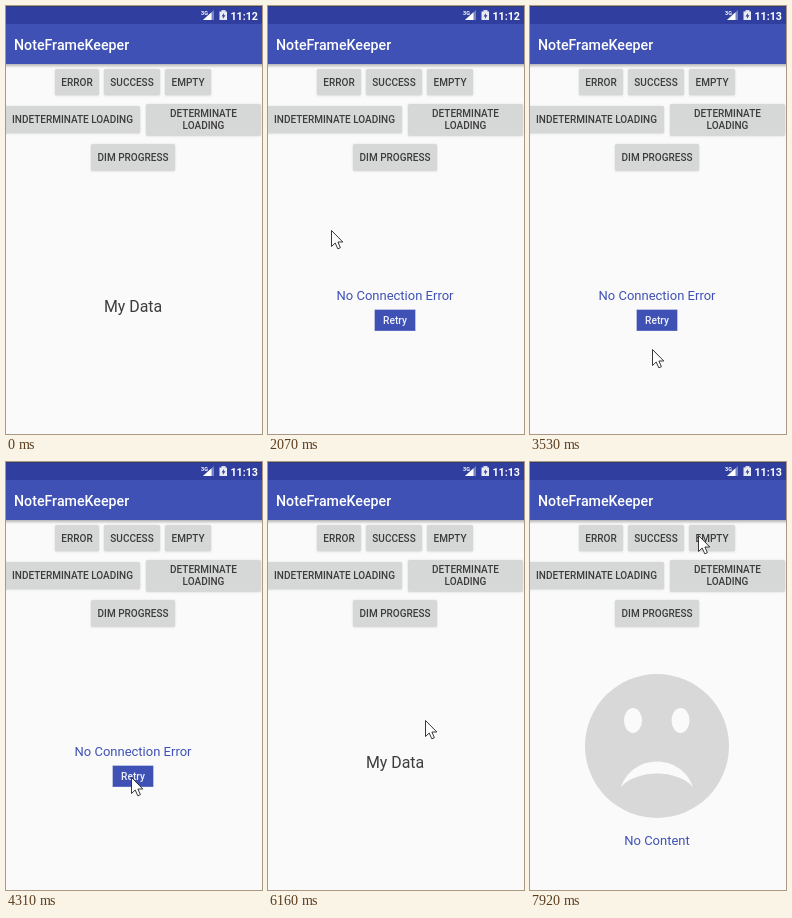
Animation of 256 by 428 pixels, one loop 8000 ms. Source, as an HTML page with a canvas:

```html
<!DOCTYPE html>
<html lang="en">
<head>
<meta charset="utf-8">
<title>Placeholder states</title>
<style>
  html, body { margin: 0; width: 100%; height: 100%; overflow: hidden; background: #fafafa; }
  canvas { display: block; width: 256px; height: 428px; }
</style>
</head>
<body>
<canvas id="stage" width="256" height="428"></canvas>
<script>
const ctx = document.getElementById('stage').getContext('2d');
const LOOP = 8000, TICKS = 104;
const INDIGO = '#3f51b5', PAPER = '#fafafa', INK = '#3c3c3c';

// Ticks at which the screen content switches
const SHOW = { cursor: 2, error: 20, clock: 34, retried: 57, empty: 99 };

// The pointer glides to each goal between two ticks; sway adds a swing on the way
const ENTRY = { x: 176, y: 378 };
const MOVES = [
  { from: 2, to: 10, x: 98, y: 55 },
  { from: 10, to: 17, x: 72, y: 78 },
  { from: 20, to: 27, x: 63, y: 224 },
  { from: 27, to: 37, x: 154, y: 331 },
  { from: 37, to: 52, x: 125, y: 315, sway: 38 },
  { from: 60, to: 70, x: 101, y: 73 },
  { from: 71, to: 80, x: 157, y: 258 },
  { from: 80, to: 84, x: 130, y: 338 },
  { from: 84, to: 94, x: 168, y: 73 }
];

const ease = k => (1 - Math.cos(Math.PI * k)) / 2;

function pointerAt(tick) {
  let { x, y } = ENTRY;
  for (const move of MOVES) {
    if (tick <= move.from) break;
    const k = Math.min(1, (tick - move.from) / (move.to - move.from));
    const swing = (move.sway || 0) * Math.sin(2 * Math.PI * k);
    x += (move.x - x) * ease(k) + swing * 0.6;
    y += (move.y - y) * ease(k) - swing;
  }
  return [Math.round(x), Math.round(y)];
}

function rect(x, y, w, h, color) {
  ctx.fillStyle = color;
  ctx.fillRect(x, y, w, h);
}

function text(str, x, y, size, color = INK, weight = 400, align = 'center') {
  ctx.font = `${weight} ${size}px Roboto, sans-serif`;
  ctx.textAlign = align;
  ctx.fillStyle = color;
  ctx.fillText(str, x, y);
}

function polygon(points, color) {
  ctx.beginPath();
  points.forEach(([x, y]) => ctx.lineTo(x, y));
  ctx.closePath();
  ctx.fillStyle = color;
  ctx.fill();
}

function ellipse(x, y, rx, ry, color) {
  ctx.beginPath();
  ctx.ellipse(x, y, rx, ry, 0, 0, Math.PI * 2);
  ctx.fillStyle = color;
  ctx.fill();
}

function button(x, y, w, h, ...lines) {
  ctx.save();
  ctx.shadowColor = 'rgba(0,0,0,.18)';
  ctx.shadowBlur = 2;
  ctx.shadowOffsetY = 0.5;
  ctx.fillStyle = '#d6d7d7';
  ctx.beginPath();
  ctx.roundRect(x, y, w, h, 1.5);
  ctx.fill();
  ctx.restore();
  const first = y + h / 2 + 3.6 - (lines.length - 1) * 6;
  lines.forEach((line, i) => text(line, x + w / 2, first + i * 12, 10, INK, 500));
}

function statusBar(time) {
  rect(0, 0, 256, 18, '#303f9f');
  rect(0, 0, 256, 1, '#303a70');
  text('3G', 195, 9, 5.5, '#fff', 700, 'left');
  polygon([[197, 14], [208, 14], [208, 4]], 'rgba(255,255,255,.35)');
  polygon([[197, 14], [205.5, 14], [205.5, 6.3]], '#fff');
  rect(215.5, 4, 4, 2, '#d5d9ee');
  rect(213.5, 5.5, 7.5, 8.5, '#e8eaf6');
  polygon([[218, 7], [215.5, 10.5], [217.2, 10.5], [216.8, 13], [219.5, 9.3], [217.8, 9.3]], '#303f9f');
  text(time, 252, 13.5, 10.7, '#fff', 700, 'right');
}

function appBar() {
  const shade = ctx.createLinearGradient(0, 58, 0, 62);
  shade.addColorStop(0, 'rgba(0,0,0,.28)');
  shade.addColorStop(1, 'rgba(0,0,0,0)');
  rect(0, 58, 256, 4, shade);
  rect(0, 18, 256, 40, INDIGO);
  text('NoteFrameKeeper', 8, 44, 14.2, '#fff', 500, 'left');
}

function buttons() {
  button(49, 63, 44, 26, 'ERROR');
  button(98, 63, 56, 26, 'SUCCESS');
  button(159, 63, 46, 26, 'EMPTY');
  button(-1, 100, 135, 27, 'INDETERMINATE LOADING');
  button(140, 98, 115, 31.5, 'DETERMINATE', 'LOADING');
  button(85, 138, 84, 26.5, 'DIM PROGRESS');
}

function errorView() {
  text('No Connection Error', 127, 294, 13, INDIGO);
  rect(106.5, 303.5, 41, 21.5, '#7b87cb');
  rect(107, 304, 40, 20.5, INDIGO);
  text('Retry', 127, 318, 10.2, '#eef0fa', 500);
}

function emptyView() {
  ellipse(127, 284, 72, 72, '#d8d8d8');
  ellipse(103, 258.5, 9, 12.5, PAPER);
  ellipse(150.5, 258.5, 9, 12.5, PAPER);
  ctx.beginPath();
  ctx.moveTo(91, 325);
  ctx.bezierCurveTo(103, 291, 151, 291, 163, 325);
  ctx.bezierCurveTo(147, 307, 107, 307, 91, 325);
  ctx.fill();
  text('No Content', 127, 383, 13, INDIGO);
}

function pointer(x, y) {
  ctx.save();
  ctx.translate(x + 0.5, y + 0.5);
  polygon([[0, 0], [0, 16], [3.7, 12.5], [6.3, 18.3], [8.9, 17.2], [6.4, 11.5], [11.3, 11.5]], '#fff');
  ctx.strokeStyle = '#222';
  ctx.lineWidth = 0.9;
  ctx.stroke();
  ctx.restore();
}

function draw(now) {
  const tick = Math.min(TICKS - 1, Math.floor((now % LOOP + 12) * TICKS / LOOP));
  rect(0, 0, 256, 428, PAPER);
  statusBar(tick < SHOW.clock ? '11:12' : '11:13');
  appBar();
  buttons();
  if (tick >= SHOW.empty) emptyView();
  else if (tick >= SHOW.error && tick < SHOW.retried) errorView();
  else text('My Data', 127, 306, 15.9);
  if (tick >= SHOW.cursor) pointer(...pointerAt(tick));
}

let start;
function loop(now) {
  start ??= now;
  draw(now - start);
  requestAnimationFrame(loop);
}
draw(0);
requestAnimationFrame(loop);
</script>
</body>
</html>
```
